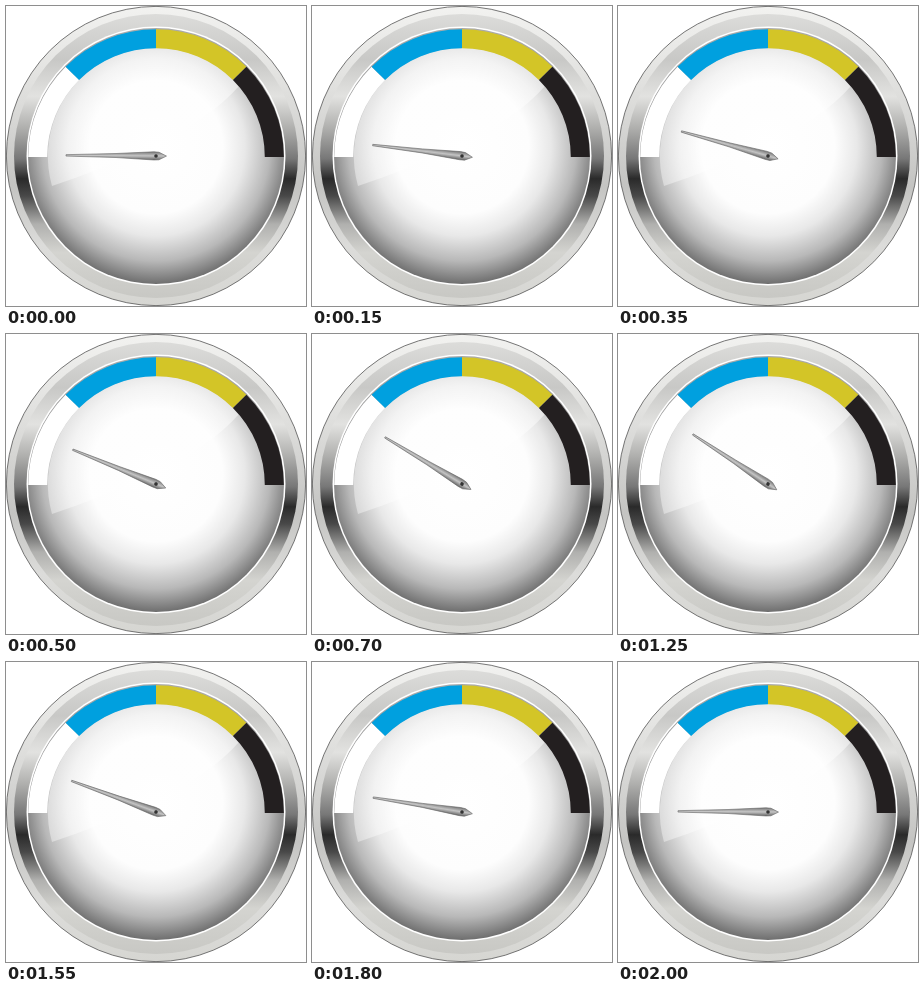
Recreate the animation shown at these times as an HTML page. Size 300x300 px, loop 2050 ms.

```html
<!DOCTYPE html>
<html lang="en">
<head>
<meta charset="utf-8">
<title>Gauge</title>
<style>
html, body { margin: 0; width: 100%; height: 100%; overflow: hidden; background: #fff; }
svg { display: block; width: 300px; height: 300px; }
</style>
</head>
<body>
<svg viewBox="0 0 300 300">
  <defs>
    <linearGradient id="rim" x1="0" y1="0" x2="0" y2="1">
      <stop offset="0" stop-color="#f2f2f0"/>
      <stop offset=".3" stop-color="#dededc"/>
      <stop offset=".6" stop-color="#c4c4c2"/>
      <stop offset=".8" stop-color="#dcdcda"/>
      <stop offset="1" stop-color="#d6d6d2"/>
    </linearGradient>
    <linearGradient id="bezel" gradientUnits="userSpaceOnUse" x1="0" y1="8" x2="0" y2="292">
      <stop offset="0" stop-color="#dcdcda"/>
      <stop offset=".16" stop-color="#c8c8c6"/>
      <stop offset=".29" stop-color="#e2e2e0"/>
      <stop offset=".4" stop-color="#b0b0ae"/>
      <stop offset=".51" stop-color="#777"/>
      <stop offset=".58" stop-color="#2a2a2a"/>
      <stop offset=".64" stop-color="#484848"/>
      <stop offset=".74" stop-color="#b0b0ae"/>
      <stop offset=".84" stop-color="#d4d4d0"/>
      <stop offset="1" stop-color="#c8c8c4"/>
    </linearGradient>
    <radialGradient id="face" gradientUnits="userSpaceOnUse" cx="150" cy="141" r="139">
      <stop offset="0" stop-color="#fff"/>
      <stop offset=".48" stop-color="#fdfdfd"/>
      <stop offset=".64" stop-color="#e8e8e8"/>
      <stop offset=".82" stop-color="#b8b8b8"/>
      <stop offset="1" stop-color="#686868"/>
    </radialGradient>
    <linearGradient id="gloss" x1="0" y1="0" x2="0" y2="1">
      <stop offset="0" stop-color="#fff" stop-opacity=".5"/>
      <stop offset="1" stop-color="#fff" stop-opacity=".4"/>
    </linearGradient>
    <linearGradient id="metal" x1="0" y1="0" x2="0" y2="1">
      <stop offset="0" stop-color="#777"/>
      <stop offset=".5" stop-color="#c4c4c4"/>
      <stop offset="1" stop-color="#666"/>
    </linearGradient>
  </defs>
  <circle cx="150" cy="150" r="149.6" fill="url(#rim)" stroke="#555" stroke-width=".8"/>
  <circle cx="150" cy="150" r="142" fill="url(#bezel)"/>
  <circle cx="150" cy="150" r="129.5" fill="#fff"/>
  <circle cx="150" cy="150" r="128" fill="url(#face)"/>
  <path d="M46 180A108.5 108.5 0 0 1 233 80Q205 112 150 138T46 180Z" fill="url(#gloss)"/>
  <g id="bands" fill="none" stroke-width="19"/>
  <g id="needle">
    <path d="M60 149.3L110 147.8L148 145.8L153 146.2L160.5 150L153 153.8L148 154L110 151.8L60 150.7Z"
      fill="url(#metal)" stroke="#666" stroke-width=".6"/>
    <circle cx="150" cy="150" r="1.8" fill="#333"/>
  </g>
</svg>
<script>
const bands = document.getElementById('bands');
const needle = document.getElementById('needle');
const R = 118.3;
const point = deg => {
  const a = deg * Math.PI / 180;
  return `${150 - R * Math.cos(a)} ${151 - R * Math.sin(a)}`;
};
['#fff', '#00a0df', '#d3c527', '#231f20'].forEach((color, i) => {
  const arc = document.createElementNS('http://www.w3.org/2000/svg', 'path');
  arc.setAttribute('d', `M${point(i * 45)}A${R} ${R} 0 0 1 ${point(i * 45 + 45)}`);
  arc.setAttribute('stroke', color);
  bands.append(arc);
});

// The needle climbs for 20 steps, then falls back for 20.
const STEP = 50, LOOP = 2050;
function draw() {
  const step = Math.floor(performance.now() % LOOP / STEP);
  const angle = 0.4 + 2.2 * (20 - Math.abs(20 - step));
  needle.setAttribute('transform', `rotate(${angle} 150 150)`);
  requestAnimationFrame(draw);
}
draw();
</script>
</body>
</html>
```
